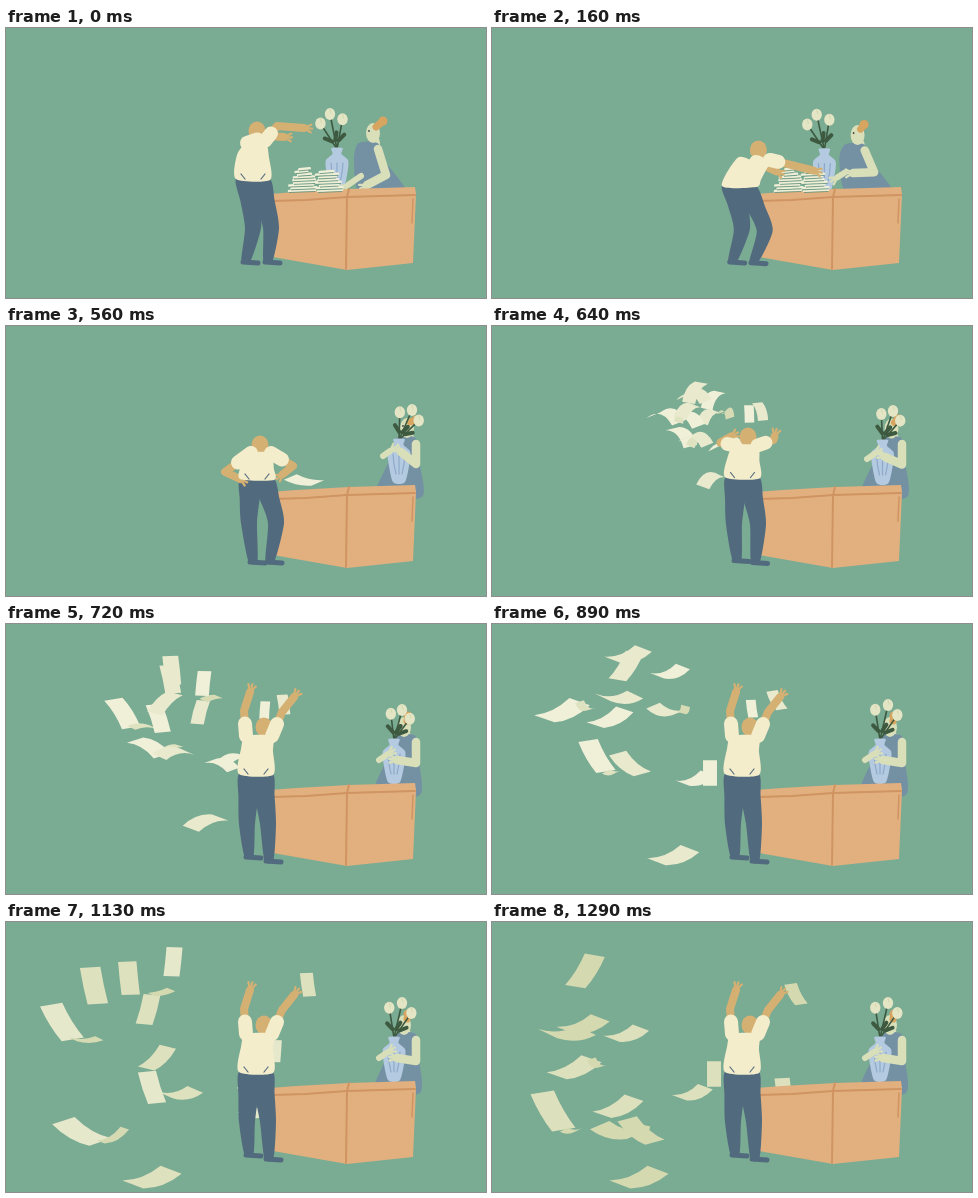
An HTML page with a canvas for the animation above (1.37 s loop, 480 by 270 pixels).

```html
<!DOCTYPE html>
<html lang="en">
<head>
<meta charset="utf-8">
<title>Paper toss</title>
<style>
html, body { margin: 0; width: 100%; height: 100%; overflow: hidden; background: #7aab93; }
canvas { display: block; width: 480px; height: 270px; }
</style>
</head>
<body>
<canvas id="stage" width="480" height="270"></canvas>
<script>
const ctx = document.getElementById('stage').getContext('2d');
const LOOP = 1370;
const C = {
  wall: '#7aab93', desk: '#e2b07f', edge: '#cf9462', pants: '#526a7e', shirt: '#f4edcb',
  tan: '#d5b073', pale: '#d9dfb9', hair: '#d8a560', dress: '#7491a4', vase: '#b4cae0',
  glaze: '#8da8ca', leaf: '#3d5940', petal: '#e3e5c4', paper: [240, 240, 217], shade: [212, 217, 176], ink: '#3f4a4a'
};

// [start ms, position along the key poses]
const STEPS = [[0, 0], [80, .35], [160, .7], [240, .95], [400, 1], [480, 1.5], [560, 2], [640, 2.5],
  [720, 3], [810, 3.5], [890, 4], [970, 4.33], [1050, 4.66], [1130, 5], [1210, 5.5], [1290, 6]];

// each joint moves through one point per pose: reach, grab, lift, throw
const MAN = {
  waist: [247, 151, 247, 161, 251, 153, 250, 150],
  chest: [247, 128, 262, 146, 252, 140, 251, 126],
  head: [251, 103, 273, 130, 254, 119, 258, 103],
  shoulderL: [241, 115, 274, 142, 245, 127, 240, 112],
  elbowL: [262, 108, 280, 152, 219, 146, 238, 87],
  handL: [278, 109, 287, 158, 234, 153, 244, 68],
  shoulderR: [259, 113, 286, 140, 265, 127, 266, 112],
  elbowR: [271, 98, 305, 152, 287, 140, 276, 88],
  handR: [298, 100, 332, 161, 277, 148, 288, 73],
  kneeL: [247, 200, 251, 202, 243, 197, 241, 200],
  ankleL: [240, 233, 241, 233, 247, 235, 243, 232],
  kneeR: [265, 200, 276, 204, 270, 197, 262, 200],
  ankleR: [262, 233, 262, 234, 264, 235, 263, 236]
};
const WOMAN = {
  hem: [377, 165, 378, 165, 393, 171, 391, 171],
  bust: [363, 132, 362, 131, 398, 135, 397, 133],
  neck: [362, 115, 363, 117, 400, 112, 400, 112],
  head: [367, 105, 365, 108, 401, 102, 398, 103],
  bun: [377, 93, 370, 98, 410, 94, 402, 92],
  elbowR: [380, 147, 383, 143, 410, 138, 410, 139],
  handR: [361, 157, 361, 140, 395, 126, 391, 136],
  elbowL: [355, 148, 352, 143, 377, 130, 373, 136],
  handL: [342, 157, 347, 146, 384, 125, 382, 130],
  vase: [331, 141, 333, 142, 393, 134, 388, 136],
  bloom: [324, 86, 325, 87, 406, 84, 396, 86, 396, 81]
};

// three points on the way down, then mean tilt and swing in degrees
const SHEETS = [
  [105, 133, 76, 211, 61, 190, 45, -15],
  [181, 233, 146, 257, 147, 257, -21, 0],
  [260, 85, 269, 129, 292, 170, 88, 6],
  [285, 77, 302, 63, 304, 73, 72, 10],
  [218, 149, 252, 190, 222, 152, 35, -55],
  [174, 87, 142, 88, 126, 210, -30, -45],
  [203, 156, 250, 170, 200, 172, 0, 22],
  [138, 141, 174, 172, 149, 210, 15, -25],
  [178, 49, 167, 40, 134, 113, -52, -32],
  [134, 43, 88, 64, 93, 50, 10, 68],
  [70, 88, 56, 101, 82, 147, 16, 42],
  [136, 32, 123, 56, 91, 104, -58, -38],
  [118, 95, 146, 166, 126, 186, 22, 50],
  [127, 74, 151, 137, 75, 112, -25, -20]
];
const HANDS = [255, 90];

const lerp = (a, b, f) => a.map((v, i) => v + (b[i] - v) * f);
const add = ([x, y], dx, dy) => [x + dx, y + dy];
const polar = ([x, y], r, a) => [x + r * Math.cos(a), y + r * Math.sin(a)];

function along(path, u) {
  const last = path.length / 2 - 1;
  const i = Math.min(Math.floor(u), last - 1);
  return lerp(path.slice(i * 2, i * 2 + 2), path.slice(i * 2 + 2, i * 2 + 4), Math.min(u - i, 1));
}

const pose = (body, u) => Object.fromEntries(Object.entries(body).map(([k, p]) => [k, along(p, u)]));

// soft closed shape through the points
function blob(pts, color) {
  const n = pts.length, at = i => pts[(i + n) % n];
  ctx.beginPath();
  ctx.moveTo(...pts[0]);
  for (let i = 0; i < n; i++) {
    const [a, b, c, d] = [at(i - 1), at(i), at(i + 1), at(i + 2)];
    ctx.bezierCurveTo(b[0] + (c[0] - a[0]) / 8, b[1] + (c[1] - a[1]) / 8,
      c[0] - (d[0] - b[0]) / 8, c[1] - (d[1] - b[1]) / 8, ...c);
  }
  ctx.fillStyle = color;
  ctx.fill();
}

// upright tapered shape: centre points with a width each
function taper(pts, widths, color) {
  const side = s => pts.map((p, i) => add(p, s * widths[i] / 2, 0));
  blob([...side(-1), ...side(1).reverse()], color);
}

function oval([x, y], rx, ry, color) {
  ctx.beginPath();
  ctx.ellipse(x, y, rx, ry, 0, 0, 7);
  ctx.fillStyle = color;
  ctx.fill();
}

function line(pts, color, width) {
  ctx.beginPath();
  for (const p of pts) ctx.lineTo(...p);
  ctx.strokeStyle = color;
  ctx.lineWidth = width;
  ctx.stroke();
}

function arm(pts, color, width) {
  line(pts, color, width);
  const [elbow, hand] = pts.slice(-2);
  const dir = Math.atan2(hand[1] - elbow[1], hand[0] - elbow[0]);
  for (const k of [-1, 0, 1]) line([hand, polar(hand, 8, dir + k * .5)], color, 2.3);
}

function sheet([x, y], len, wid, deg, bend, color) {
  const a = deg * Math.PI / 180;
  // short edges stay close to level, so a tilted sheet looks slanted
  const c = (deg - Math.sign(deg || 1) * 90) * .3 * Math.PI / 180;
  const corner = (s, t) => add(polar(polar([x, y], s * len / 2, a), t * wid / 2, c), 0, -bend / 2);
  const middle = t => add(polar([x, y], t * wid / 2, c), -Math.sin(a) * bend, Math.cos(a) * bend * 1.5);
  ctx.beginPath();
  ctx.moveTo(...corner(-1, -1));
  ctx.quadraticCurveTo(...middle(-1), ...corner(1, -1));
  ctx.lineTo(...corner(1, 1));
  ctx.quadraticCurveTo(...middle(1), ...corner(-1, 1));
  ctx.closePath();
  ctx.fillStyle = color;
  ctx.fill();
}

function drawSheets(u) {
  const tone = f => `rgb(${lerp(C.paper, C.shade, Math.min(f, 1))})`;
  if (u >= 1.5 && u <= 2) sheet([298, 155], 28, 14, 12, 2, tone(0));
  if (u <= 2) return;
  const burst = 1 - (1 - Math.min((u - 2) / 2, 1)) ** 2;
  const phase = Math.cos(Math.PI * (u - 3));
  const age = Math.max(0, (u - 4) / 2);
  SHEETS.forEach((s, i) => {
    const p = lerp(HANDS, along(s.slice(0, 6), Math.max(u - 4, 0)), burst);
    const deg = s[6] + s[7] * phase, a = deg * Math.PI / 180;
    const len = 17 + Math.hypot(p[0] - HANDS[0], p[1] - HANDS[1]) * .12;
    const bend = 4 * Math.cos(a) * Math.min(1, 2 * u - 7);
    const fade = age * .7 + i % 2 * .3;
    sheet(p, len, len * .55, deg, bend, tone(fade));
    if (i % 5 === 0) {
      const fold = deg - 60 * Math.sign(deg), size = len * (.5 + .15 * phase);
      sheet(polar(polar(p, len / 2, a), size / 2, fold * Math.PI / 180), size, 9, fold, bend, tone(fade + .6));
    }
  });
}

function drawVase(vase, bloom) {
  const top = add(vase, 0, -20);
  const lean = Math.atan2(bloom[1] - top[1], bloom[0] - top[0]);
  const reach = Math.hypot(bloom[0] - top[0], bloom[1] - top[1]);
  for (const k of [-1, 0, 1]) {
    const dir = lean + k * .38;
    const tip = polar(top, reach * (1 - Math.abs(k) * .15), dir);
    line([top, tip], C.leaf, 1.6);
    const knot = polar(top, reach * .25, dir);
    line([knot, polar(knot, 8, dir + (k || .6) * .6)], C.leaf, 4);
    oval(tip, 5.2, 6, C.petal);
    line([add(tip, 0, -5), add(tip, 1, -1)], `rgb(${C.shade})`, 1);
  }
  taper([-21, -15, -9, 0, 22].map(dy => add(vase, 0, dy)), [11, 9, 22, 22, 12], C.vase);
  for (const k of [-1, 0, 1])
    line([add(vase, k * 6, -6), add(vase, k * 5, 4), add(vase, k * 3, 14)], C.glaze, 1.2);
}

function drawWoman(u) {
  const w = pose(WOMAN, u);
  oval(add(w.head, 2, 10), 5, 7, C.pale);
  taper([w.hem, w.bust, w.neck], [46, 30, 19], C.dress);
  oval(w.head, 7, 10, C.pale);
  line([add(w.head, 3, -6), w.bun], C.hair, 7);
  oval(w.bun, 4.5, 4.5, C.hair);
  oval(add(w.head, -4, -2), .9, 1.1, C.ink);
  drawVase(w.vase, w.bloom);
  arm([add(w.neck, 10, 6), w.elbowR, w.handR], C.pale, 8.5);
  arm([w.elbowL, w.handL], C.pale, 6);
}

function drawDesk() {
  ctx.beginPath();
  for (const p of [[264, 166], [290, 164], [343, 161], [409, 159], [410, 166], [407, 235], [341, 242], [267, 229]])
    ctx.lineTo(...p);
  ctx.fillStyle = C.desk;
  ctx.fill();
  line([[266, 173], [300, 172], [341, 169], [409, 167]], C.edge, 2);
  line([[343, 161], [341, 169], [340, 241]], C.edge, 2);
  line([[407, 171], [406, 195]], C.edge, 1.5);
}

function drawStack() {
  const row = (a, b, y) => {
    line([[a, y], [b, y - 1]], `rgb(${C.paper})`, 2.6);
    line([[a, y + 1.5], [b, y + .5]], '#5f8f78', .8);
  };
  for (let i = 0; i < 9; i++) {
    const y = 163 - i * 2.7, wob = Math.sin(i * 2.4) * 2;
    row(283 + i * 1.2 + wob, (i > 5 ? 303 : 309) + wob, y);
    if (i < 8) row(312 - wob, 336 - i + wob, y);
  }
}

function drawMan(u) {
  const m = pose(MAN, u), { waist, chest } = m;
  for (const [s, knee, ankle] of [[-1, m.kneeL, m.ankleL], [1, m.kneeR, m.ankleR]]) {
    const hip = add(waist, s * 6, 0);
    const thigh = add(lerp(hip, knee, .45), (knee[0] - ankle[0]) * .1, 0);
    taper([hip, thigh, knee, ankle], [22, 20, 16, 9], C.pants);
    line([add(ankle, -3, 1), add(ankle, 12, 2)], C.pants, 5);
  }
  arm([m.shoulderL, m.elbowL, m.handL], C.tan, 8);
  arm([m.shoulderR, m.elbowR, m.handR], C.tan, 8);
  oval(m.head, 8.5, 9.5, C.tan);

  const neck = lerp(m.shoulderL, m.shoulderR, .5);
  const up = Math.atan2(neck[1] - waist[1], neck[0] - waist[0]);
  blob([add(waist, -17, 0), polar(chest, -16, up + Math.PI / 2), m.shoulderL, m.shoulderR,
    polar(chest, 16, up + Math.PI / 2), add(waist, 17, 1)], C.shirt);
  line([m.shoulderL, lerp(m.shoulderL, m.elbowL, .5)], C.shirt, 14);
  line([m.shoulderR, lerp(m.shoulderR, m.elbowR, .5)], C.shirt, 14);
  if (Math.abs(neck[0] - waist[0]) < 5)
    for (const s of [-1, 1]) line([add(waist, s * 12, -5), add(waist, s * 8, 0)], C.pants, 1.2);
}

function draw(u) {
  ctx.fillStyle = C.wall;
  ctx.fillRect(0, 0, 480, 270);
  drawWoman(u);
  drawSheets(u);
  drawDesk();
  if (u < 1.5) drawStack();
  drawMan(u);
}

ctx.lineCap = ctx.lineJoin = 'round';
const start = performance.now();
function tick() {
  const t = (performance.now() - start) % LOOP;
  draw(STEPS.filter(s => s[0] <= t).pop()[1]);
  requestAnimationFrame(tick);
}
tick();
</script>
</body>
</html>
```
